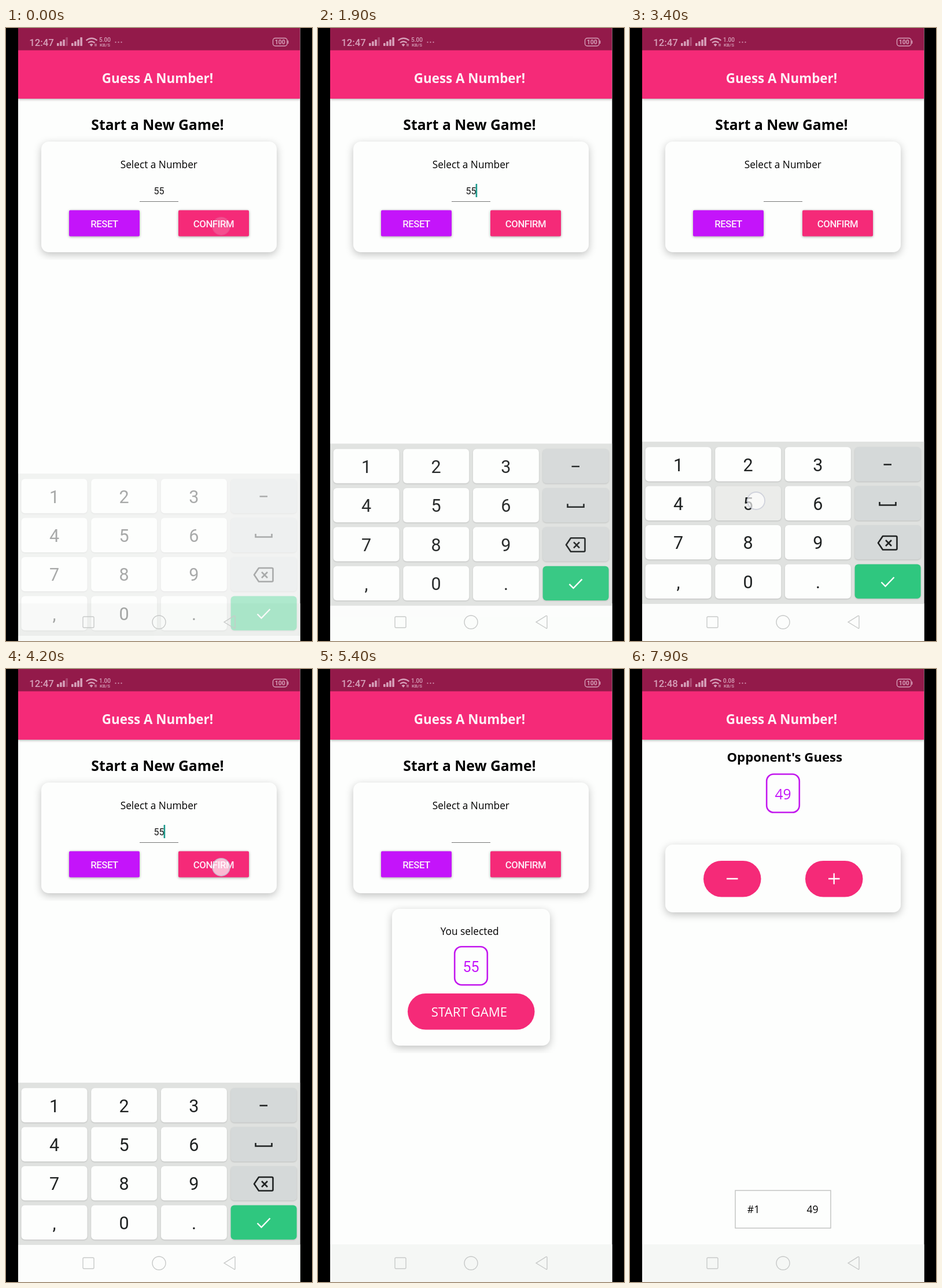
An HTML page for the animation above (8 s loop, 529 by 1058 pixels).

```html
<!DOCTYPE html>
<html lang="en">
<head>
<meta charset="utf-8">
<title>Guess A Number</title>
<style>
html, body { margin: 0; width: 100%; height: 100%; overflow: hidden; background: #000; }
svg { display: block; width: 529px; height: 1058px; }
text { font-family: "Open Sans", sans-serif; }
.rb { font-family: Roboto, sans-serif; }
.bold { font-weight: 700; }
.card { fill: #fdfefd; filter: drop-shadow(0 4px 7px rgba(0,0,0,.24)); }
.btn { filter: drop-shadow(0 1px 2px rgba(0,0,0,.35)); }
.key { filter: drop-shadow(0 1px 1px rgba(0,0,0,.16)); }
.line { fill: none; }
</style>
</head>
<body>
<svg id="stage" viewBox="0 0 529 1058"></svg>
<script>
const LOOP = 8000, STEP = 100;
const PINK = '#f52a78', PURPLE = '#c414fa', PAPER = '#fdfefd', SOFT = '#d6a0b9';

const rect = (x, y, w, h, fill, r = 0, more = '') =>
  `<rect x="${x}" y="${y}" width="${w}" height="${h}" rx="${r}" fill="${fill}" ${more}/>`;
const text = (s, x, y, size, fill = '#000', more = '') =>
  `<text x="${x}" y="${y}" font-size="${size}" fill="${fill}" text-anchor="middle" ${more}>${s}</text>`;
const path = (d, color, width, more = '') =>
  `<path d="${d}" class="line" stroke="${color}" stroke-width="${width}" ${more}/>`;
const group = (id, body, more = '') => `<g id="${id}" ${more}>${body}</g>`;
const card = (x, y, w, h) => rect(x, y, w, h, PAPER, 13, 'class="card"');
const numberBox = y =>
  rect(236.2, y, 56.6, 66, 'none', 12, 'stroke="#c318ee" stroke-width="2.6"');

function statusBar() {
  let s = rect(21, 0, 487.5, 38.5, '#931a4a');
  s += text('12:47', 61.5, 31, 16.8, SOFT, 'id="clock" class="rb" font-weight="500"');
  [88, 113].forEach((x, g) => [5, 8, 11, 15].forEach((h, i) => {
    s += rect(x + i * 5.1, 31 - h, 3.6, h, SOFT, .8, g === 0 && i === 3 ? 'opacity=".35"' : '');
  }));
  s += path('M138.5 21.5q9.500-7.500 19 0M142 25.500q5.500-4.500 11.500 0', SOFT, 2.2);
  s += `<path d="M144.500 28.500q3-2.500 6 0l-3 3.500z" fill="${SOFT}"/>`;
  s += path('M154 27v4.500M156 27v4.500', SOFT, 1.1);
  s += text('5.00', 171, 24, 10, SOFT, 'id="speed" class="rb" font-weight="500"');
  s += text('KB/S', 171, 31.5, 8, SOFT, 'class="rb" font-weight="500"');
  [189.500, 194.500, 199.500].forEach(x => s += `<circle cx="${x}" cy="24.500" r="1.1" fill="${SOFT}"/>`);
  s += rect(461.500, 17.500, 24.500, 13.500, 'none', 4, `stroke="${SOFT}" stroke-width="1.400"`);
  s += rect(487, 21.500, 1.300, 5.500, SOFT, .6);
  return s + text('100', 473.700, 28.200, 10.500, SOFT, 'class="rb bold"');
}

function startScreen() {
  let form = card(61, 196, 407, 191);
  form += text('Select a Number', 264.3, 241.500, 17.3);
  form += path('M231 299.500H298', '#777', 1.2);
  form += text('', 264.500, 287, 16, '#111', 'id="entry" class="rb"');
  form += rect(272.500, 269, 2.600, 23, '#1a9a8c', 0, 'id="caret"');
  [['RESET', 109, PURPLE], ['CONFIRM', 298, PINK]].forEach(([s, x, c]) => {
    form += rect(x, 314.500, 122, 45, c, 2, 'class="btn"');
    form += text(s, x + 61, 344, 16.7, '#fdeef8', 'class="rb" font-weight="500" letter-spacing="-.4"');
  });
  let picked = card(128, 414, 273, 236);
  picked += text('You selected', 262.2, 459, 17.3);
  picked += numberBox(479.200);
  picked += text('55', 264.500, 523, 25, PURPLE, 'class="rb"');
  picked += group('go', rect(155, 560, 219.500, 62.500, PINK, 31.2) +
    text('START GAME', 261.500, 600, 22.2, '#fff'));
  return text('Start a New Game!', 262, 175.500, 24.7, '#000', 'class="bold"') +
    group('form', form) + group('picked', picked, 'clip-path="url(#pickedClip)"');
}

function gameScreen() {
  let s = text("Opponent's Guess", 267.3, 159.500, 22.2, '#000', 'class="bold"');
  s += numberBox(181.500) + text('49', 264.500, 225, 24.700, PURPLE);
  s += card(61, 303, 407, 117);
  s += rect(127, 331, 99.500, 62.500, PINK, 31.2) + rect(303, 331, 99.500, 62.500, PINK, 31.2);
  s += path('M167 362H186.500M343 362H362.500M352.700 352.500V371.500', '#fff', 2.3);
  s += rect(182, 900, 165, 65, 'none', 0, 'stroke="#bcbebc" stroke-width="1.3"');
  return s + text('#1', 213.500, 939, 17.600) + text('49', 315.500, 939, 17.600);
}

function keyboard() {
  const ink = '#1f2222';
  let s = rect(21, 714, 487.500, 280, '#e0e2e0') + rect(21, 994, 487.500, 130, '#fcfdfc');
  ['123-', '456_', '789<', ',0.!'].forEach((row, r) => [...row].forEach((c, i) => {
    const x = 26.500 + i * 120.700, y = 723.200 + r * 67.400, mid = x + 57;
    const fill = c === '!' ? '#2fc77f' : i === 3 ? '#d5d9d9' : '#fdfefd';
    s += rect(x, y, 114, 59.300, fill, 6, `class="key" id="key${r}${i}"`);
    if (i < 3) s += text(c, mid, y + 41.300, 30.500, ink, 'class="rb"');
  }));
  s += path('M438.500 753.500H452', ink, 2.4);
  s += path('M431.500 818v5.500h28V818', ink, 2.6);
  s += path('M437 877h22.500q2 0 2 2v19.500q0 2-2 2H437l-8-11.700zM442 884l10 10M452 884l-10 10', ink, 2.6, 'stroke-linejoin="round"');
  return s + path('M434.500 956.500l7 7 15-15.500', '#fff', 2.4);
}

const navIcons = () =>
  rect(133, 1016, 19, 19, 'none', 2, 'stroke="#c8cac9" stroke-width="1.4"') +
  '<circle cx="264.500" cy="1025.500" r="11.500" fill="none" stroke="#c8cac9" stroke-width="1.4"/>' +
  path('M377 1025.300L394.500 1014.500Q396 1014 396 1015.500V1035Q396 1036.700 394.500 1036z', '#c8cac9', 1.4);

const stage = document.getElementById('stage');
stage.innerHTML = `<defs>
  <clipPath id="app"><rect x="21" width="487.500" height="1058"/></clipPath>
  <clipPath id="formClip"><rect x="43" y="180" width="442" height="220"/></clipPath>
  <clipPath id="pickedClip"><rect x="110" y="400" width="311" height="263"/></clipPath>
</defs><g clip-path="url(#app)">` +
  rect(21, 0, 488, 1058, PAPER) + rect(21, 993, 488, 65, '#f5f7f5') +
  group('start', startScreen()) + group('game', gameScreen()) +
  rect(21, 38, 487.500, 84, PINK, 0, 'class="btn"') + statusBar() +
  text('Guess A Number!', 262, 94.500, 22.4, '#fdf0f6', 'class="bold"') +
  group('keys', keyboard()) + navIcons() +
  '<circle id="touch" r="15" fill="#fff" fill-opacity=".68" stroke="#c5c8d6" stroke-opacity=".75" stroke-width="1.8"/></g>';

const el = {};
stage.querySelectorAll('[id]').forEach(n => el[n.id] = n);

// Each table row starts at its first value and holds until the next row.
const at = (table, t) => table.filter(row => row[0] <= t).pop().slice(1);

const ENTRY = [[0, '55'], [2600, '5'], [2900, ''], [3500, '5'], [3800, '55'], [5200, '']];
const CARET = [[0, 0], [1700, 1], [2200, 0], [2500, 1], [3400, 0], [3500, 1], [4300, 0]];
const SPEED = [[0, '5.00'], [2700, '1.00'], [6800, '0.08']];
const BOARD = [ // time, offset, opacity
  [0, 55, .38], [100, 0, 0], [1800, 34, .6], [1900, 3.3, .95], [2000, 0, 1],
  [4300, 14, .82], [4400, 55, .38], [4500, 0, 0]];
const PRESS = [[0, ''], [2500, 'key23'], [2600, ''], [2800, 'key23'], [2900, ''],
  [3400, 'key11'], [3500, ''], [3700, 'key11'], [3800, '']];
const GO = [[0, 1], [6900, .6], [7000, .75]];
const TAPS = [ // down, up, x, y
  [-100, 0, 372, 342], [1600, 1800, 290, 281], [2500, 2600, 447, 889], [2800, 2900, 447, 889],
  [3400, 3500, 218, 816], [3700, 3800, 218, 816], [4100, 4300, 372, 342],
  [5000, 5200, 372, 342], [6800, 7000, 294, 591]];

const show = (node, on) => node.style.display = on ? '' : 'none';
const pressable = [['key23', '#d5d9d9', '#c6caca'], ['key11', '#fdfefd', '#ebecea']];

function draw(t) {
  const [entry] = at(ENTRY, t), [caret] = at(CARET, t), [drop, alpha] = at(BOARD, t), [key] = at(PRESS, t);
  const playing = t >= 7100, picked = t >= 5200;
  show(el.start, !playing);
  show(el.game, playing);
  show(el.picked, picked);
  el.form.setAttribute('clip-path', picked ? 'none' : 'url(#formClip)');
  el.entry.textContent = entry;
  show(el.caret, caret);
  el.caret.setAttribute('x', 263.200 + entry.length * 4.700);
  el.speed.textContent = at(SPEED, t)[0];
  el.clock.textContent = t >= 7300 ? '12:48' : '12:47';
  el.go.setAttribute('opacity', at(GO, t)[0]);
  show(el.keys, alpha);
  el.keys.setAttribute('opacity', alpha);
  el.keys.setAttribute('transform', `translate(0 ${drop})`);
  pressable.forEach(([id, idle, down]) => el[id].setAttribute('fill', key === id ? down : idle));

  const tap = TAPS.find(([down, up]) => t >= down && t < up + STEP);
  show(el.touch, tap);
  if (tap) {
    el.touch.setAttribute('cx', tap[2]);
    el.touch.setAttribute('cy', tap[3]);
    el.touch.setAttribute('opacity', t < tap[1] ? 1 : .25);
  }
}

const begin = performance.now();
function tick() {
  const t = (performance.now() - begin) % LOOP;
  draw(Math.floor(t / STEP) * STEP);
  requestAnimationFrame(tick);
}
draw(0);
tick();
</script>
</body>
</html>
```
